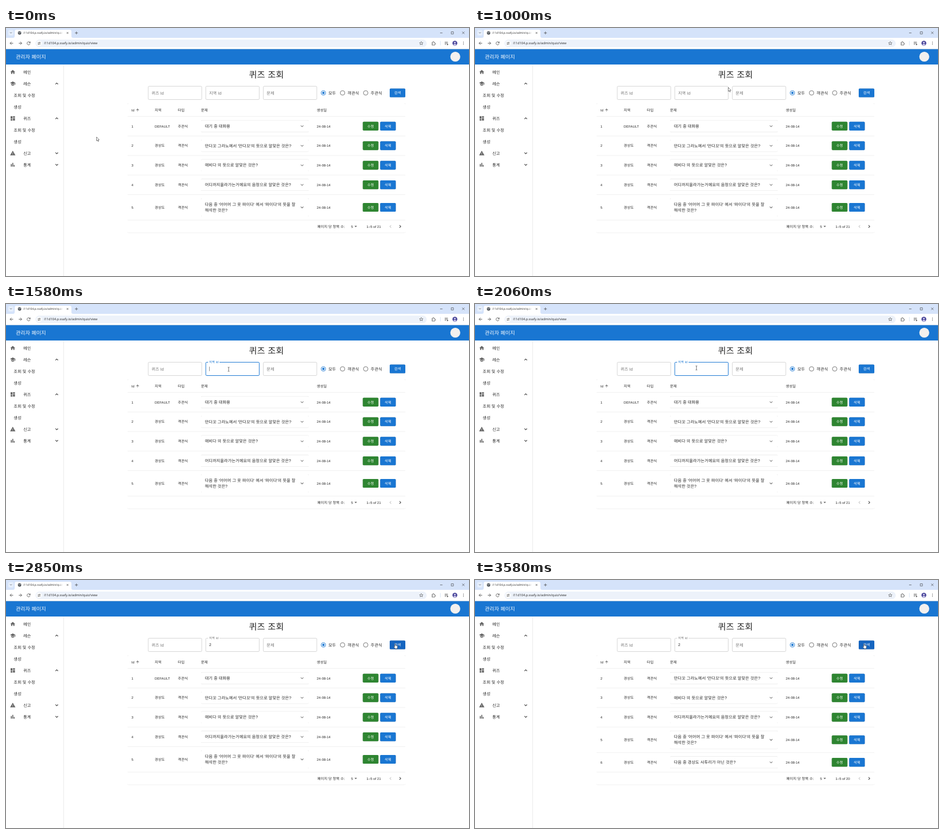
Recreate the animation shown at these times as an HTML page. Size 800 by 428 pixels, loop 3610 ms.

```html
<!DOCTYPE html>
<html lang="ko">
<head>
<meta charset="utf-8">
<title>퀴즈 조회</title>
<style>
  html, body { margin: 0; width: 100%; height: 100%; overflow: hidden; background: #fff; }
  svg { display: block; width: 100vw; height: 100vh; }
  text { font-family: "Liberation Sans", "Noto Sans CJK KR", "Noto Sans CJK", sans-serif; text-rendering: geometricPrecision; white-space: pre; }
  .chrome { font-family: "Open Sans", "Noto Sans", sans-serif; }
  .card { filter: drop-shadow(0 .5px .5px rgba(0,0,0,.28)); }
</style>
</head>
<body>
<svg id="stage" viewBox="0 0 800 428" preserveAspectRatio="none"></svg>
<script>
const LOOP = 3610, STEP = 30;
const BLUE = '#1976d2', GREEN = '#2e8531', INK = '#262626', GREY = '#757575';
const FOCUS_AT = 1390, TYPE_AT = 2240, CLICK_AT = 2820, RESULT_AT = 2970;
const stage = document.getElementById('stage');

function add(parent, tag, attrs, content) {
  const el = document.createElementNS('http://www.w3.org/2000/svg', tag);
  set(el, attrs);
  if (content !== undefined) el.textContent = content;
  parent.appendChild(el);
  return el;
}
function set(el, attrs) {
  for (const key in attrs) el.setAttribute(key, attrs[key]);
}
const group = (parent = stage) => add(parent, 'g', {});
const show = (el, on) => set(el, { display: on ? 'inline' : 'none' });

function rect(g, x, y, w, h, fill, extra) {
  return add(g, 'rect', { x, y, width: w, height: h, fill, ...extra });
}
function circle(g, cx, cy, r, fill, extra) {
  return add(g, 'circle', { cx, cy, r, fill, ...extra });
}
function line(g, d, stroke = '#444', width = 0.7, extra) {
  return add(g, 'path', { d, fill: 'none', stroke, 'stroke-width': width, ...extra });
}
// Text is placed by its vertical centre; Hangul is set slightly larger than Latin.
const em = (s, size) => /[가-힣]/.test(s) ? size * 1.065 : size;
function text(g, x, y, s, size = 5.83, extra) {
  const k = em(s, size);
  return add(g, 'text', { x, y: y + k * 0.365, 'font-size': k, 'letter-spacing': size * 0.012, fill: INK, ...extra }, s);
}

const ICONS = {
  home: 'M10 20v-6h4v6h5v-8h3L12 3 2 12h3v8z',
  school: 'M5 13.2v4L12 21l7-3.8v-4L12 17zM12 3 1 9l11 6 9-4.9V17h2V9z',
  board: 'M3 13h8V3H3zm0 8h8v-6H3zm10 0h8V11h-8zm0-18v6h8V3z',
  warning: 'M1 21h22L12 2zm12-3h-2v-2h2zm0-4h-2v-4h2z',
  bars: 'M4 9h4v11H4zM16 13h4v7h-4zM10 4h4v16h-4z',
  down: 'M16.6 8.6 12 13.2 7.4 8.6 6 10l6 6 6-6z',
  up: 'M12 8l-6 6 1.4 1.4 4.6-4.6 4.6 4.6L18 14z',
  left: 'M15.4 7.4 14 6l-6 6 6 6 1.4-1.4-4.6-4.6z',
  right: 'M10 6 8.6 7.4l4.6 4.6-4.6 4.6L10 18l6-6z',
  sort: 'M4 12l1.4 1.4L11 7.8V20h2V7.8l5.6 5.6L20 12l-8-8z',
  drop: 'M7 10l5 5 5-5z',
};
function icon(g, name, cx, cy, fill = '#555', k = 5 / 12) {
  return add(g, 'path', { d: ICONS[name], fill, 'fill-rule': 'evenodd', transform: `translate(${cx - 12 * k} ${cy - 12 * k}) scale(${k})` });
}
function button(g, cx, cy, label, fill) {
  const box = rect(g, cx - 13.5, cy - 7.6, 27, 15.2, fill, { rx: 1.6, class: 'card' });
  text(g, cx, cy, label, 5.83, { fill: '#fff', 'text-anchor': 'middle', 'font-weight': 500 });
  return box;
}

function drawBrowser() {
  const g = group();
  rect(g, 0, 0, 800, 17, '#d5e3fa');
  rect(g, 4, 3.5, 9, 9.5, '#e6effc', { rx: 2.5 });
  line(g, 'M7 7.5l1.5 1.5L10 7.5');
  rect(g, 0, 17, 800, 19.5, '#fff');
  add(g, 'path', { d: 'M12 17q3 0 3-3V6q0-3 3-3h92q3 0 3 3v8q0 3 3 3z', fill: '#fff' });
  circle(g, 23.5, 8.5, 2.9, '#4b5056');
  line(g, 'M21.4 7.4l2 .8-.3 1.6M24.2 6.2l.3 1.4 1.3.4', '#fff', 0.6);
  text(g, 30, 8.4, 'i11d104.p.ssafy.io/admin/quiz', 4.85, { class: 'chrome', 'letter-spacing': 0 });
  const fade = add(g, 'linearGradient', { id: 'fade' });
  add(fade, 'stop', { offset: 0, 'stop-color': '#fff', 'stop-opacity': 0 });
  add(fade, 'stop', { offset: 1, 'stop-color': '#fff' });
  rect(g, 89, 4, 11, 9, 'url(#fade)');
  line(g, 'M104.8 7l3 3m0-3l-3 3M121.7 6v5m-2.5-2.5h5');
  line(g, 'M750 8.5h4.2M769.3 6.5h3.8v3.8h-3.8zM788.2 6.3l4 4m0-4l-4 4', '#333', 0.6);

  line(g, 'M12.4 26.3H7m2.6-2.6L7 26.3l2.6 2.6', '#444', 0.8);
  line(g, 'M22 26.3h5.2m-2.5-2.6l2.5 2.6-2.5 2.6', '#444', 0.8);
  line(g, 'M41.6 25.4a2.7 2.7 0 1 0 0 2M41.9 23.4v2.3h-2.3', '#444', 0.8);
  rect(g, 51, 20, 676, 13, '#edf2fa', { rx: 6.5 });
  circle(g, 57.2, 26.4, 4.4, '#fff');
  line(g, 'M54.8 25.2h2.6m1.6 0h.7M54.8 27.7h.7m1.6 0h2.6');
  circle(g, 58.2, 25.2, 0.8, 'none', { stroke: '#444', 'stroke-width': 0.6 });
  circle(g, 56.3, 27.7, 0.8, 'none', { stroke: '#444', 'stroke-width': 0.6 });
  text(g, 65.4, 26.2, 'i11d104.p.ssafy.io/admin/quiz/view', 5.65, { class: 'chrome', 'letter-spacing': 0 });
  line(g, 'M717.5 23.3l.9 2 2.1.2-1.6 1.4.5 2.1-1.9-1.1-1.9 1.1.5-2.1-1.6-1.4 2.1-.2z', '#444', 0.6);
  line(g, 'M736 25h1.6q-.3-1.7.9-1.7t.9 1.7h1.5v1.6q1.4-.2 1.4.7t-1.4.7v1.4H736v-1.5q1.2 0 1.2-.7t-1.2-.7z');
  line(g, 'M750.5 22.5v7.5', '#c5d5ee', 0.6);
  line(g, 'M758 24.3h5.5M758 26.2h5.5M758 28.1h2.7');
  add(g, 'path', { d: 'M762 27l2.5 1.4-2.5 1.4z', fill: '#444' });
  circle(g, 775.6, 26.3, 4.2, '#4d4a9c');
  circle(g, 775.6, 25.2, 1.4, '#d9d4f2');
  add(g, 'path', { d: 'M772.9 29q2.7-3.5 5.4 0-2.7 2-5.4 0z', fill: '#d9d4f2' });
  for (const y of [24.1, 26.3, 28.5]) circle(g, 790.4, y, 0.6, '#444');
}

function drawFrame() {
  const g = group();
  rect(g, 0, 36.5, 800, 26.5, BLUE, { class: 'card' });
  text(g, 17, 49.3, '관리자 페이지', 8.33, { fill: '#fff', 'font-weight': 500 });
  circle(g, 776.3, 49.5, 8.6, '#f3f0ee');

  line(g, 'M99.6 63.5V428', '#dedede', 0.6);
  const menu = [
    ['메인', 'home'], ['레슨', 'school', 'up'], ['조회 및 수정'], ['생성'],
    ['퀴즈', 'board', 'up'], ['조회 및 수정'], ['생성'],
    ['신고', 'warning', 'down'], ['통계', 'bars', 'down'],
  ];
  menu.forEach(([label, mark, arrow], i) => {
    const y = 76 + 20 * i;
    text(g, mark ? 30 : 13.3, y, label, 6.67);
    if (mark) icon(g, mark, 11.7, y, '#666');
    if (arrow) icon(g, arrow, 87.7, y, '#222');
  });
  text(g, 450, 80.8, '퀴즈 조회', 14.17, { 'text-anchor': 'middle' });
}

function makeField(x, label) {
  const g = group();
  const box = rect(g, x, 100.5, 92.4, 23, 'none', { rx: 1.7 });
  const notch = rect(g, x + 4, 99.3, 19.8, 2.2, '#fff');
  const caption = text(g, x + 5.7, 112, label, 6.67);
  const size = em(label, 6.67);
  // lift: 0 = label rests inside the box, 1 = label sits on the border
  return (lift, focused, hovered) => {
    const k = size * (1 - lift / 4);
    set(box, {
      stroke: focused ? BLUE : hovered ? '#333' : '#bdbdbd',
      'stroke-width': focused ? 0.95 : 0.6,
    });
    set(notch, { width: 19.8 * lift });
    set(caption, { y: 112 - 11.8 * lift + k * 0.365, 'font-size': k, fill: focused ? BLUE : GREY });
  };
}

function drawFilters() {
  const g = group();
  [[548.4, '모두'], [581.5, '객관식'], [621.5, '주관식']].forEach(([x, label], i) => {
    circle(g, x, 112, 3.9, 'none', { stroke: i ? '#666' : BLUE, 'stroke-width': 0.85 });
    if (!i) circle(g, x, 112, 2.1, BLUE);
    text(g, x + 8.6, 112, label, 6.67);
  });
  return button(g, 676.5, 112, '검색', BLUE);
}

const QUESTIONS = [
  ['대기 중 대화용'],
  ["만다꼬 그라노에서 '만다꼬'의 뜻으로 알맞은 것은?"],
  ['애비다 의 뜻으로 알맞은 것은?'],
  ['어디까지올라가는거에요의 음정으로 알맞은 것은?'],
  ["다음 중 '어어어 그 옷 파이다' 에서 '파이다'의 뜻을 잘", '해석한 것은?'],
  ['다음 중 경상도 사투리가 아닌 것은?'],
];
const rule = (g, y) => line(g, `M210 ${y}H690`, '#e2e2e2', 0.5);

function drawTable() {
  const g = group();
  rect(g, 210, 130, 480, 223.2, '#fff', { rx: 1.7, class: 'card' });
  const heads = [[216.7, 'Id'], [257, '지역'], [297, '타입'], [337, '문제'], [537, '생성일']];
  for (const [x, label] of heads) text(g, x, 141.6, label, 5.83, { 'font-weight': 500 });
  icon(g, 'sort', 227.3, 141.5, '#333', 0.29);
  rule(g, 152.6);
  text(g, 538, 342.4, '페이지 당 항목 수:');
  text(g, 596.3, 342.4, '5');
  icon(g, 'drop', 604.3, 342.4);
  icon(g, 'left', 664.3, 342.4, '#bbb');
  icon(g, 'right', 681, 342.4, '#222');
}

function makePage(first, total) {
  const g = group();
  let top = 152.6;
  QUESTIONS.slice(first, first + 5).forEach((lines, i) => {
    const id = first + i + 1, tall = lines.length > 1;
    const height = tall ? 44 : 33.75, mid = top + height / 2 - 0.1, half = tall ? 15.4 : 10.2;
    text(g, 216.7, mid, String(id));
    text(g, 257, mid, id === 1 ? 'DEFAULT' : '경상도');
    text(g, 297, mid, id === 1 ? '주관식' : '객관식');
    rect(g, 337, mid - half, 186, half * 2, '#fff', { rx: 1.6, class: 'card' });
    lines.forEach((s, n) => text(g, 343.7, mid + (n - (lines.length - 1) / 2) * 10, s, 6.67));
    icon(g, 'down', 511.6, mid);
    text(g, 537, mid, '24-08-14');
    button(g, 630, mid, '수정', GREEN);
    button(g, 660, mid, '삭제', BLUE);
    top += height;
    rule(g, top);
  });
  text(g, 623, 342.4, `1–5 of ${total}`);
  return g;
}

function makePointers() {
  const arrow = group(), beam = group(), hand = group();
  const outline = { fill: '#fff', stroke: '#222', 'stroke-width': 0.55, 'stroke-linejoin': 'round' };
  add(arrow, 'path', { d: 'M0 0V6.8l1.5-1.4 1.2 2.5 1-.5-1.1-2.4h2.1z', ...outline });
  line(beam, 'M-1.5-3.5h1.1L0-3.2l.4-.3h1.1M0-3.2v6.4M-1.5 3.5h1.1L0 3.2l.4.3h1.1', '#222', 0.6);
  add(hand, 'path', { d: 'M-.7-3.7q.7-.9 1.4 0v2.5l3 .7q.8.3.6 1.2L3.6 4.3H.1L-2.4 1q0-1.2 1.7 0z', ...outline });
  return { arrow, beam, hand };
}

const PATH = [
  [0, 156.5, 188], [270, 156.5, 188], [400, 205, 150], [580, 297.5, 90.3],
  [790, 380, 94], [1000, 440.5, 103], [1090, 446, 107], [1330, 385, 112.5],
  [1580, 384.7, 112.7], [1910, 382.6, 110.4], [2480, 382.6, 110.4],
  [2580, 455, 111], [2700, 620, 113], [2790, 672.3, 114.3], [LOOP, 672.3, 114.3],
];
function pointerAt(t) {
  const i = PATH.findIndex(p => p[0] > t);
  const [t0, x0, y0] = PATH[i - 1], [t1, x1, y1] = PATH[i];
  const p = (t - t0) / (t1 - t0);
  return [x0 + (x1 - x0) * p, y0 + (y1 - y0) * p];
}

drawBrowser();
drawFrame();
const FIELD_X = [245.8, 345.2, 444.6];
const fields = ['퀴즈 Id', '지역 Id', '문제'].map((label, i) => makeField(FIELD_X[i], label));
const typed = text(stage, 350.9, 112, '2', 6.67);
const caret = rect(stage, 351, 108.2, 0.5, 7.6, '#222');
const search = drawFilters();
drawTable();
const before = makePage(0, 21), after = makePage(1, 20);
const pointers = makePointers();

function render(t) {
  const [x, y] = pointerAt(t);
  const inRow = y > 100.5 && y < 123.5;
  const over = FIELD_X.findIndex(fx => inRow && x > fx && x < fx + 92.4);
  const focused = t >= FOCUS_AT && t < CLICK_AT;
  const p = Math.min(1, Math.max(0, (t - FOCUS_AT) / 200));
  const lift = 1 - (1 - p) ** 3;
  fields.forEach((draw, i) => draw(i === 1 ? lift : 0, i === 1 && focused, i === over));

  const hasText = t >= TYPE_AT;
  show(typed, hasText);
  show(caret, focused && (t - (hasText ? TYPE_AT : FOCUS_AT)) % 1000 < 500);
  set(caret, { x: hasText ? 355 : 351 });
  set(search, { fill: inRow && x > 663 ? '#1565c0' : BLUE });
  show(before, t < RESULT_AT);
  show(after, t >= RESULT_AT);

  const kind = over >= 0 ? 'beam' : inRow && x > 543 ? 'hand' : 'arrow';
  for (const name in pointers) show(pointers[name], name === kind);
  set(pointers[kind], { transform: `translate(${x} ${y})` });
}

const start = performance.now();
function tick() {
  const t = (performance.now() - start) % LOOP;
  render(Math.floor(t / STEP) * STEP);
  requestAnimationFrame(tick);
}
tick();
</script>
</body>
</html>
```
